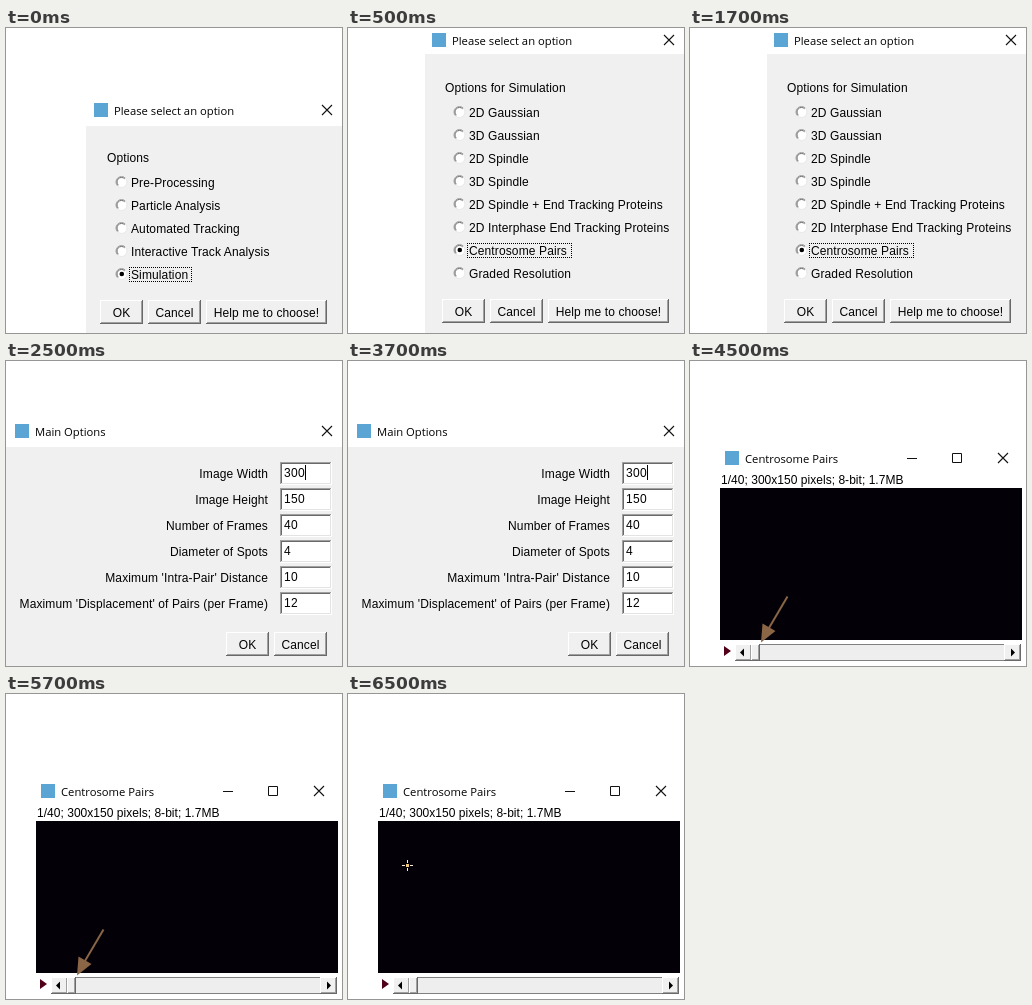
An HTML page that plays this animation: 336x305 px, repeating every 8 s.

```html
<!DOCTYPE html>
<html lang="en">
<head>
<meta charset="utf-8">
<title>Simulation dialogs</title>
<style>
html, body { margin: 0; width: 100%; height: 100%; overflow: hidden; background: #fff; }
svg { display: block; width: 336px; height: 305px; }
text { font: 12px "Liberation Sans", Arial, sans-serif; letter-spacing: .12px; fill: #000; white-space: pre; }
.title { font: 11.25px "Open Sans", "Noto Sans", sans-serif; letter-spacing: 0; }
.status { letter-spacing: .03px; }
.value { letter-spacing: .33px; }
.crisp { shape-rendering: crispEdges; }
</style>
</head>
<body>
<svg id="stage" viewBox="0 0 336 305"></svg>
<script>
const LOOP = 8000;
const FACE = '#f0f0f0';

const rect = (x, y, w, h, fill) =>
  `<rect class="crisp" x="${x}" y="${y}" width="${w}" height="${h}" fill="${fill}"/>`;
const path = (d, stroke, more = '') =>
  `<path d="${d}" fill="none" stroke="${stroke}" ${more}/>`;
const shape = (d, fill) => `<path d="${d}" fill="${fill}"/>`;
const text = (x, y, s, more = '') => `<text x="${x}" y="${y}" ${more}>${s}</text>`;

// Beveled box: outer and inner edge colours, light side first
function bevel(x, y, w, h, fill, [a, b, c, d]) {
  return rect(x, y, w, h, b) + rect(x, y, w - 1, h - 1, a) +
    rect(x + 1, y + 1, w - 2, h - 2, d) + rect(x + 1, y + 1, w - 3, h - 3, c) +
    rect(x + 2, y + 2, w - 4, h - 4, fill);
}
const RAISED = ['#fff', '#696969', FACE, '#a0a0a0'];
const SUNKEN = ['#a0a0a0', '#fff', '#696969', '#e3e3e3'];

function button(x, y, w, label) {
  return bevel(x, y, w, 24, FACE, RAISED) +
    text(x + w / 2, y + 17, label, 'text-anchor="middle"');
}

const cross = (x, y) =>
  path(`M${x - 5} ${y - 5}l10 10m0 -10l-10 10`, '#111', 'stroke-width="1.1"');

function titleBar(x, y, s) {
  return rect(x, y - 12, 14, 14, '#5ba5d5') + text(x + 20, y, s, 'class="title"');
}

function radio(x, y, label, on) {
  const outer = 'M-3.9 3.9A5.5 5.5 0 0 1 3.9 -3.9';
  return `<g transform="translate(${x} ${y})"><circle r="5.5" fill="#fff"/>` +
    path(outer, '#a0a0a0') + path(outer, '#e8e8e8', 'transform="rotate(180)"') +
    path('M-3.2 3.2A4.5 4.5 0 0 1 3.2 -3.2', '#696969') +
    (on ? '<circle cx=".3" r="2.3"/>' : '') + '</g>' + text(x + 9.5, y + 5, label);
}

function focusBox(x, y, w, h) {
  return `<rect class="crisp" x="${x + .5}" y="${y + .5}" width="${w - 1}" height="${h - 1}" fill="none" stroke="#000" stroke-dasharray="1" stroke-dashoffset=".5"/>`;
}

const dialogButtons = y =>
  button(94, y, 43, 'OK') + button(142, y, 53, 'Cancel') +
  button(200, y, 121, 'Help me to choose!');

function choices(x, y, list, picked) {
  return list.map((s, i) => radio(x, y + 23 * i, s, i === picked)).join('');
}

function optionDialog() {
  return rect(80, 98, 256, 207, FACE) + titleBar(88, 87, 'Please select an option') +
    cross(321, 82) + text(101, 134, 'Options') +
    choices(115.5, 154, ['Pre-Processing', 'Particle Analysis', 'Automated Tracking',
      'Interactive Track Analysis', 'Simulation'], 4) +
    focusBox(123, 239, 63, 15) + dialogButtons(272);
}

function simulationDialog() {
  return rect(77, 26, 259, 279, FACE) + titleBar(84, 17, 'Please select an option') +
    cross(321, 12) + text(97, 64, 'Options for Simulation') +
    choices(111.5, 84, ['2D Gaussian', '3D Gaussian', '2D Spindle', '3D Spindle',
      '2D Spindle + End Tracking Proteins', '2D Interphase End Tracking Proteins',
      'Centrosome Pairs', 'Graded Resolution'], 6) +
    focusBox(119, 215, 105, 15) + dialogButtons(271);
}

function mainOptions() {
  const rows = [['Image Width', 300], ['Image Height', 150], ['Number of Frames', 40],
    ['Diameter of Spots', 4], ["Maximum 'Intra-Pair' Distance", 10],
    ["Maximum 'Displacement' of Pairs (per Frame)", 12]];
  const fields = rows.map(([label, value], i) => {
    const y = 101 + 26 * i;
    return text(262, y + 16, label, 'text-anchor="end"') +
      bevel(274, y, 52, 23, '#fff', SUNKEN) + text(278, y + 15, value, 'class="value"');
  });
  return rect(0, 86, 336, 219, FACE) + titleBar(9, 75, 'Main Options') + cross(321, 70) +
    fields.join('') + rect(299, 104, 1, 15, '#000') +
    button(220, 271, 43, 'OK') + button(268, 271, 53, 'Cancel');
}

function imageWindow() {
  return titleBar(35, 102, 'Centrosome Pairs') +
    rect(217, 97, 10, 1, '#111') +
    path('M262.5 92.5h9v9h-9z', '#111') + cross(313, 97) +
    text(31, 123, '1/40; 300x150 pixels; 8-bit; 1.7MB', 'class="status"') +
    rect(30, 127, 302, 152, '#040007') +
    shape('M34 285l7 5l-7 5z', '#500018') +
    rect(45, 283, 286, 17, '#808080') + rect(45, 284, 286, 15, '#eee') +
    bevel(45, 283, 17, 17, FACE, RAISED) + bevel(61, 283, 9, 17, FACE, RAISED) +
    bevel(314, 283, 17, 17, FACE, RAISED) +
    shape('M50 291.5l4 -4v8z', '#000') + shape('M325 291.5l-4 -4v8z', '#000');
}

const pointer = () =>
  path('M97.5 235.5L76 272', '#8a6546', 'stroke-width="2"') +
  shape('M71 281.5L72.5 262.5L85.5 270z', '#8a6546');

const spot = () =>
  rect(59, 166, 1, 11, '#f6edda') + rect(54, 171, 11, 1, '#f6edda') +
  rect(57, 169, 5, 5, '#040007') + rect(58, 170, 3, 3, '#ecc678');

// [draw, start ms, end ms]
const scenes = [
  [optionDialog, 0, 500],
  [simulationDialog, 500, 2500],
  [mainOptions, 2500, 4500],
  [imageWindow, 4500, 8000],
  [pointer, 4500, 6500],
  [spot, 6500, 8000]
];

const stage = document.getElementById('stage');
stage.innerHTML = scenes.map(([draw]) => `<g visibility="hidden">${draw()}</g>`).join('');
const groups = [...stage.children];
const begin = performance.now();

function show() {
  const t = Math.max(0, performance.now() - begin) % LOOP;
  scenes.forEach(([, from, to], i) =>
    groups[i].setAttribute('visibility', t >= from && t < to ? 'visible' : 'hidden'));
  requestAnimationFrame(show);
}
show();
</script>
</body>
</html>
```
